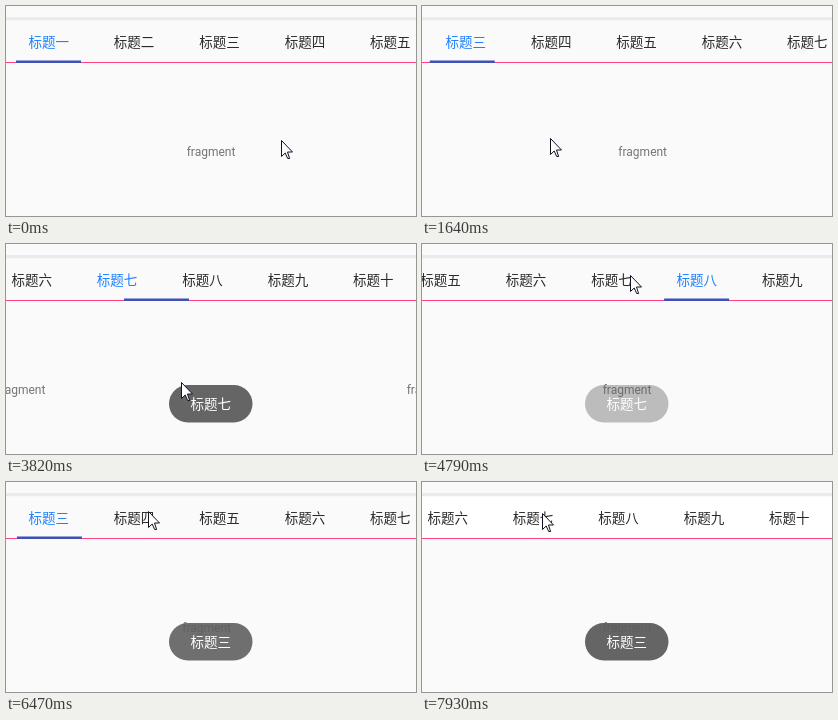
An HTML page with a canvas for the animation above (8000 ms loop, 410 by 210 pixels).

```html
<!DOCTYPE html>
<html lang="zh">
<head>
<meta charset="utf-8">
<style>
  html, body { margin: 0; width: 100%; height: 100%; overflow: hidden; background: #fafafa; }
  canvas { display: block; }
</style>
</head>
<body>
<canvas id="stage" width="410" height="210"></canvas>
<script>
const ctx = document.getElementById('stage').getContext('2d');
const LOOP = 8000, WIDTH = 410, HEIGHT = 210;
const TAB = 85.4, FIRST = 42.7, MAX_SCROLL = TAB * 10 - WIDTH;
const CJK = '13.5px "Noto Sans CJK SC", "Noto Sans CJK", sans-serif';
const titles = [...'一二三四五六七八九十'].map(n => '标题' + n);

// The screen refreshes in bursts and rests in between.
const bursts = [
  [710, 1640], [1760, 2770], [2890, 3820], [3940, 4910], [5060, 5900], [6200, 7210], [7360, 7930]
];

function refreshTime(now) {
  const burst = bursts.findLast(([start]) => start <= now);
  if (!burst) return 0;
  const [start, end] = burst;
  const step = (end - start) / Math.round((end - start) / 130);
  return Math.min(end, start + Math.floor((now - start) / step + .01) * step);
}

// Each move eases from start to end and adds its amounts: [start, end, amount...].
const swipes = [
  [710, 1250, 1], [1250, 1692, 1], [2380, 2790, 4], [3430, 4250, 1], [6180, 6460, -5]
];
const scrolls = [
  [710, 1250, TAB], [1250, 1667, TAB], [2130, 2380, 96], [2510, 2770, MAX_SCROLL - 2 * TAB - 96],
  [4370, 5060, -126], [5060, 5700, -252], [6200, 6452, 2 * TAB - 66],
  [7060, 7790, MAX_SCROLL - 2 * TAB]
];
const pointerMoves = [
  [710, 980, -145, 0], [980, 1250, 142, 0], [1300, 1520, -144, -2],
  [1760, 2130, 252, -94], [2130, 2380, -97, 0],
  [2890, 3310, 36, 97], [3430, 3820, -144, 3], [3940, 4370, -45, -107],
  [4370, 5060, 126, 0], [5060, 5200, -120, 3], [5200, 5600, 15, -4], [5630, 5900, -9, -1],
  [6500, 7060, 138, 3], [7060, 7360, -160, -1]
];
const toastFades = [[2490, 2890, 1], [4576, 4927, -1], [6250, 6492, 1]];

function ease(u) {
  u = Math.min(1, Math.max(0, u));
  return u * u * (3 - 2 * u);
}

const total = (moves, t, axis = 0) => moves.reduce(
  (sum, [start, end, ...amounts]) => sum + amounts[axis] * ease((t - start) / (end - start)), 0);

function rect(color, x, y, w, h) {
  ctx.fillStyle = color;
  ctx.fillRect(x, y, w, h);
}

function label(text, x, y, color, font) {
  ctx.font = font;
  ctx.fillStyle = color;
  ctx.fillText(text, x, y);
}

function drawTabs(t, page) {
  const offset = FIRST - total(scrolls, t);
  if (t >= 5060 && t < 6200) rect('#fff', 0, 29, WIDTH, 37);
  if (t >= 7360) rect('#fff', 0, 14, WIDTH, 43);
  rect('#ebebeb', 0, 11, WIDTH, 3.3);
  titles.forEach((title, i) =>
    label(title, offset + i * TAB, 41, i === Math.round(page) ? '#2080ff' : '#2a2a2a', CJK));
  rect('#ff4081', 0, 56, WIDTH, 1);
  rect('#3f51b5', offset + page * TAB - 32.7, 54.5, 65, 2.5);
}

function drawPages(page) {
  titles.forEach((_, i) =>
    label('fragment', 205 + (i - page) * WIDTH, 150, '#757575', '12px Roboto, sans-serif'));
}

function drawToast(t) {
  const opacity = total(toastFades, t);
  ctx.globalAlpha = .95 * opacity;
  ctx.fillStyle = '#5d5d5d';
  ctx.beginPath();
  ctx.roundRect(163, 141, 83.5, 37.5, 18.75);
  ctx.fill();
  ctx.globalAlpha = Math.min(1, 3 * opacity);
  label(titles[t < 5060 ? 6 : 2], 204.8, 165, '#fff', CJK);
  ctx.globalAlpha = 1;
}

const arrow = new Path2D('M.5 .5V16.5L4.2 13L6.7 18.5H8.6L6.5 12H11.5Z');

function drawPointer(t) {
  ctx.save();
  ctx.translate(
    Math.round(275 + total(pointerMoves, t, 0)),
    Math.round(134 + total(pointerMoves, t, 1)));
  ctx.fillStyle = '#fff';
  ctx.strokeStyle = '#112';
  ctx.fill(arrow);
  ctx.stroke(arrow);
  ctx.restore();
}

function render() {
  const t = refreshTime(performance.now() % LOOP);
  const page = total(swipes, t);
  rect('#fafafa', 0, 0, WIDTH, HEIGHT);
  ctx.textAlign = 'center';
  drawTabs(t, page);
  drawPages(page);
  drawToast(t);
  drawPointer(t);
  requestAnimationFrame(render);
}
render();
</script>
</body>
</html>
```
